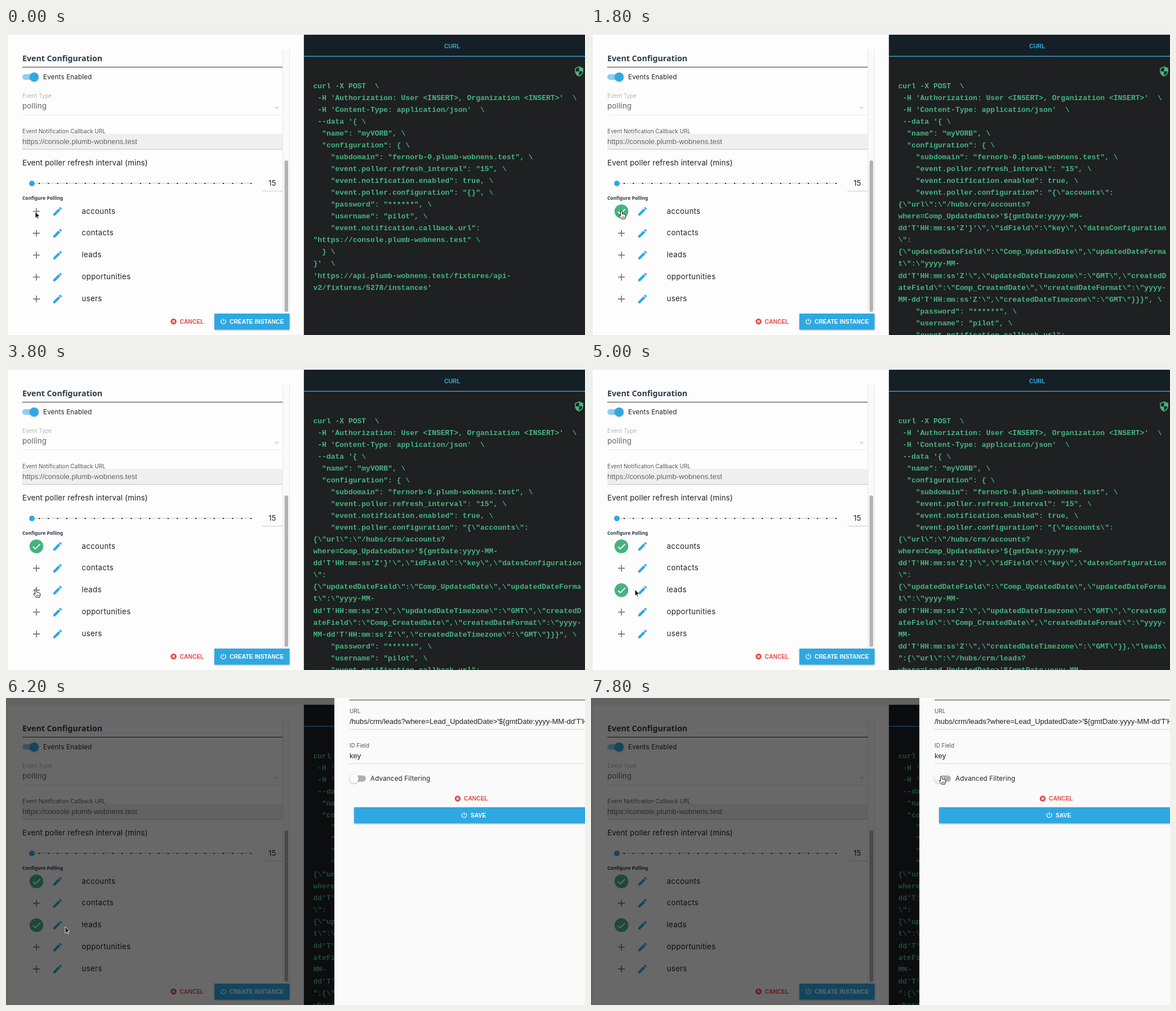
These frames come from a looping animation (1028x545 px, 8 s). An HTML page:

```html
<!DOCTYPE html>
<html lang="en">
<head>
<meta charset="utf-8">
<title>Event configuration</title>
<style>
  html, body { margin: 0; width: 100%; height: 100%; overflow: hidden; background: #efefef; }
  #stage { position: relative; width: 1028px; height: 545px; overflow: hidden; }
  svg { position: absolute; left: 0; top: 0; }
  text { font-family: Inter, "Open Sans", sans-serif; fill: #222; white-space: pre; }
  .head { font: 600 14.2px "Noto Sans", sans-serif; fill: #2c3b48; }
  .small-head { font: 700 8.4px "Noto Sans", sans-serif; fill: #2c3b48; }
  .body { font-size: 13.4px; letter-spacing: .14px; }
  .row { font-size: 13.2px; letter-spacing: .35px; }
  .switch { font-size: 11.6px; letter-spacing: .18px; }
  .label { font-size: 9.9px; fill: #555; }
  .faint { fill: #b4b4b4; }
  .field { font: 13px "Liberation Sans", Arial, sans-serif; }
  .action { font: 700 10.3px "Liberation Sans", Arial, sans-serif; }
  .dots { stroke: #b5b5b5; stroke-dasharray: 1 1; }
  .raised { filter: drop-shadow(0 1px 1.5px rgba(0, 0, 0, .28)); }
  pre {
    position: absolute; left: 545.5px; top: 92.5px; margin: 0; color: #46b481;
    font: bold 13px/21.06px "Liberation Mono", "Courier New", monospace;
  }
</style>
</head>
<body>
<div id="stage">
<svg width="1028" height="545">
  <defs>
    <path id="pencil" fill="#2fa8e2" transform="scale(.84) translate(-12 -12)" d="M3 17.25V21h3.75L17.81 9.94l-3.75-3.75zM20.71 7.04c.39-.39.39-1.02 0-1.41l-2.34-2.34c-.39-.39-1.02-.39-1.41 0l-1.83 1.83 3.75 3.75z"/>
    <path id="plus" d="M-6 0H6M0-6V6" stroke="#707070" stroke-width="1.6"/>
    <g id="check">
      <circle r="12.2" fill="#45b380"/>
      <path d="M-6 .5L-2 4.5 6.5-4" fill="none" stroke="#fff" stroke-width="1.8"/>
    </g>
    <g id="cross">
      <circle r="5.3" fill="#e84a48"/>
      <path d="M-2-2L2 2M2-2L-2 2" stroke="#fff" stroke-width="1.4"/>
    </g>
    <path id="power" d="M-2.5-3.5A4.3 4.3 0 1 0 2.5-3.5M0-5.2V0" fill="none" stroke="#fff" stroke-width="1.2"/>
  </defs>
  <rect x="3" y="12" width="526" height="533" fill="#fdfdfd"/>

  <text class="head" x="29" y="59">Event Configuration</text>
  <path d="M29 69.5H491" stroke="#333"/>
  <rect x="29" y="82" width="28" height="10" rx="5" fill="#90cdf0"/>
  <circle class="raised" cx="50" cy="87" r="8" fill="#2fa8e2"/>
  <text class="switch" x="66" y="91">Events Enabled</text>

  <text class="label faint" x="29" y="123.5">Event Type</text>
  <text class="body" x="29" y="143" style="fill:#636363">polling</text>
  <path d="M476 140h9l-4.5 4.5z" fill="#dcdcdc"/>
  <path class="dots" d="M29 154.5H491" opacity=".55"/>

  <rect x="29" y="188" width="462" height="27" fill="#efefef"/>
  <text class="label" x="29" y="186.5">Event Notification Callback URL</text>
  <text class="field" x="29" y="206" style="fill:#666">https://console.plumb-wobnens.test</text>
  <path d="M29 215.5H491" stroke="#c4c4c4"/>

  <text class="body" x="29" y="244">Event poller refresh interval (mins)</text>
  <path d="M46 275.5H436" stroke="#c9c9c9"/>
  <g id="ticks" fill="#222"></g>
  <circle cx="46" cy="276" r="5" fill="#2fa8e2"/>
  <text class="body" x="466" y="280">15</text>
  <path d="M455 289.5H491" stroke="#ccc"/>

  <text class="small-head" x="29" y="304.5">Configure Polling</text>
  <g id="rows"></g>

  <rect x="491" y="39" width="13" height="466" fill="#fafafa"/>
  <path d="M491.5 39V505M503.5 39V505" stroke="#e6e6e6"/>
  <rect x="494.5" y="235" width="6.5" height="269" rx="3.2" fill="#b3b3b3"/>

  <use href="#cross" x="297.5" y="521"/>
  <text class="action" x="308.5" y="524.7" style="fill:#e84a48">CANCEL</text>
  <rect class="raised" x="370" y="507" width="133.5" height="28.5" rx="1" fill="#2fa8e2"/>
  <use href="#power" x="386" y="521"/>
  <text class="action" x="397" y="524.7" style="fill:#fff">CREATE INSTANCE</text>

  <rect class="raised" x="529" y="12" width="510" height="540" fill="#1e2021"/>
  <rect x="529" y="12" width="499" height="38" fill="#152026"/>
  <rect x="529" y="49.5" width="499" height="1.5" fill="#3b9ad2"/>
  <text class="action" x="778" y="35.7" style="fill:#2fa8e2">CURL</text>
  <path fill="#46b481" transform="translate(1017.5 77) scale(.82) translate(-12 -12)" d="M12 1L3 5v6c0 5.55 3.84 10.74 9 12 5.16-1.26 9-6.45 9-12V5zm0 10.99h7c-.53 4.12-3.28 7.79-7 8.94V12H5V6.3l7-3.11z"/>
</svg>

<pre>curl -X POST  \
 -H 'Authorization: User &lt;INSERT>, Organization &lt;INSERT>'  \
 -H 'Content-Type: application/json'  \
 --data '{ \
  "name": "myVORB", \
  "configuration": { \
    "subdomain": "fernorb-0.plumb-wobnens.test", \
    "event.poller.refresh_interval": "15", \
    "event.notification.enabled": true, \
    "event.poller.configuration": "{<span data-from="0" data-to="1400">}", \</span><span data-from="1400" data-to="8000">\"accounts\":
{\"url\":\"/hubs/crm/accounts?
where=Comp_UpdatedDate>'${gmtDate:yyyy-MM-
dd'T'HH:mm:ss'Z'}'\",\"idField\":\"key\",\"datesConfiguration
\":
{\"updatedDateField\":\"Comp_UpdatedDate\",\"updatedDateForma
t\":\"yyyy-MM-
dd'T'HH:mm:ss'Z'\",\"updatedDateTimezone\":\"GMT\",\"createdD
ateField\":\"Comp_CreatedDate\",\"createdDateFormat\":\"yyyy-
MM-</span><span data-from="1400" data-to="4400">dd'T'HH:mm:ss'Z'\",\"createdDateTimezone\":\"GMT\"}}}", \</span><span data-from="4400" data-to="8000">
dd'T'HH:mm:ss'Z'\",\"createdDateTimezone\":\"GMT\"}},\"leads\
":{\"url\":\"/hubs/crm/leads?
where=Lead_UpdatedDate>'${gmtDate:yyyy-MM-
dd'T'HH:mm:ss'Z'}'\",\"idField\":\"key\"}}", \</span>
    "password": "******", \
    "username": "pilot", \
    "event.notification.callback.url":
"https://console.plumb-wobnens.test" \
  } \
}'  \
'https://api.plumb-wobnens.test/fixtures/api-
v2/fixtures/5278/instances'</pre>

<svg width="1028" height="545">
  <g data-from="6200" data-to="8000">
    <rect width="1028" height="545" fill="#000" opacity=".59"/>
    <rect x="583" width="445" height="545" fill="#fafafa"/>
    <path d="M610 3.5H1028" stroke="#333"/>
    <text class="label" x="610" y="26.5">URL</text>
    <text class="field" x="610" y="45.5">/hubs/crm/leads?where=Lead_UpdatedDate>'${gmtDate:yyyy-MM-dd'T'HH:mm:ss'Z'}'</text>
    <path class="dots" d="M610 55.5H1028"/>
    <text class="label" x="610" y="87.5">ID Field</text>
    <text class="field" x="610" y="106.5">key</text>
    <path class="dots" d="M610 116.5H1028"/>
    <rect x="611" y="137.5" width="28" height="11" rx="5.5" fill="#b0b0b0"/>
    <circle class="raised" cx="618" cy="143" r="8" fill="#fafafa"/>
    <text class="switch" x="647" y="147">Advanced Filtering</text>
    <use href="#cross" x="802" y="178.5"/>
    <text class="action" x="813" y="182.2" style="fill:#e84a48">CANCEL</text>
    <rect class="raised" x="618" y="194" width="420" height="28.5" rx="1" fill="#2fa8e2"/>
    <use href="#power" x="813.5" y="208"/>
    <text class="action" x="825" y="211.7" style="fill:#fff">SAVE</text>
  </g>
  <g id="cursor" stroke-linejoin="round">
    <path id="arrow" d="M0 0V11.5L2.6 9.2 4.4 13 6.2 12.2 4.5 8.5H8Z" fill="#111" stroke="#fff" stroke-width=".9"/>
    <g id="hand" stroke="#111">
      <path fill="#fff" d="M-1.5 1.2a1.5 1.5 0 0 1 3 0V5.2c1-.6 2-.3 2.3.5 1-.5 1.9-.1 2.1.7 1-.3 1.8.2 1.8 1.3V10c0 1.5-.8 2-1.2 4H.2C-.6 12.5-2.5 10.8-3.7 8.8c-.7-1.2.7-2 1.6-1l.6.6Z"/>
      <path d="M1.2 9.5v2.5M3.2 9.5v2.5M5.2 9.5v2.5" stroke-width=".8"/>
    </g>
  </g>
</svg>
</div>
<script>
  const LOOP = 8000, STEP = 200;
  const byId = id => document.getElementById(id);

  byId('ticks').innerHTML = Array.from({ length: 24 }, (_, i) =>
    `<rect x="${434 - i * 16.35}" y="275" width="2" height="2"/>`).join('');

  // Time at which each entry gets its check mark.
  const checkedAt = { accounts: 1400, contacts: LOOP, leads: 4400, opportunities: LOOP, users: LOOP };
  byId('rows').innerHTML = Object.entries(checkedAt).map(([name, at], i) => {
    const y = 325.5 + i * 38.9;
    return `<use href="#plus" x="54" y="${y}" data-from="0" data-to="${at}"/>
      <use href="#check" x="54" y="${y}" data-from="${at}" data-to="${LOOP}"/>
      <use href="#pencil" x="91.5" y="${y}"/>
      <text class="row" x="134.5" y="${y + 4}">${name}</text>`;
  }).join('');

  // Pointer stops: time, x, y, shape from that time on.
  const stops = [
    [0, 52, 326, 'arrow'], [400, 52, 326, 'arrow'], [600, 54, 325, 'hand'],
    [2200, 54, 325, 'hand'], [3400, 53, 402, 'hand'], [4600, 53, 402, 'hand'],
    [4800, 66, 402, 'arrow'], [5000, 78, 402, 'arrow'], [5400, 90, 400, 'hand'],
    [6000, 90, 400, 'hand'], [6200, 105, 406, 'arrow'], [6400, 105, 406, 'arrow'],
    [7400, 622, 139, 'hand'], [LOOP, 622, 139, 'hand']
  ];
  const timed = [...document.querySelectorAll('[data-from]')];

  function pointerAt(t) {
    const i = stops.findIndex((s, n) => n + 1 === stops.length || t < stops[n + 1][0]);
    const [t0, x0, y0, shape] = stops[i];
    const [t1, x1, y1] = stops[i + 1];
    const u = (t - t0) / (t1 - t0), ease = u * u * (3 - 2 * u);
    return [x0 + (x1 - x0) * ease, y0 + (y1 - y0) * ease, shape];
  }

  function draw(t) {
    for (const el of timed)
      el.style.display = t >= +el.dataset.from && t < +el.dataset.to ? '' : 'none';
    const [x, y, shape] = pointerAt(t);
    byId('cursor').setAttribute('transform', `translate(${x} ${y})`);
    for (const id of ['arrow', 'hand']) byId(id).style.display = id === shape ? '' : 'none';
  }

  const start = performance.now();
  function tick() {
    const t = (performance.now() - start) % LOOP;
    draw(Math.floor(t / STEP) * STEP);
    requestAnimationFrame(tick);
  }
  tick();
</script>
</body>
</html>
```
